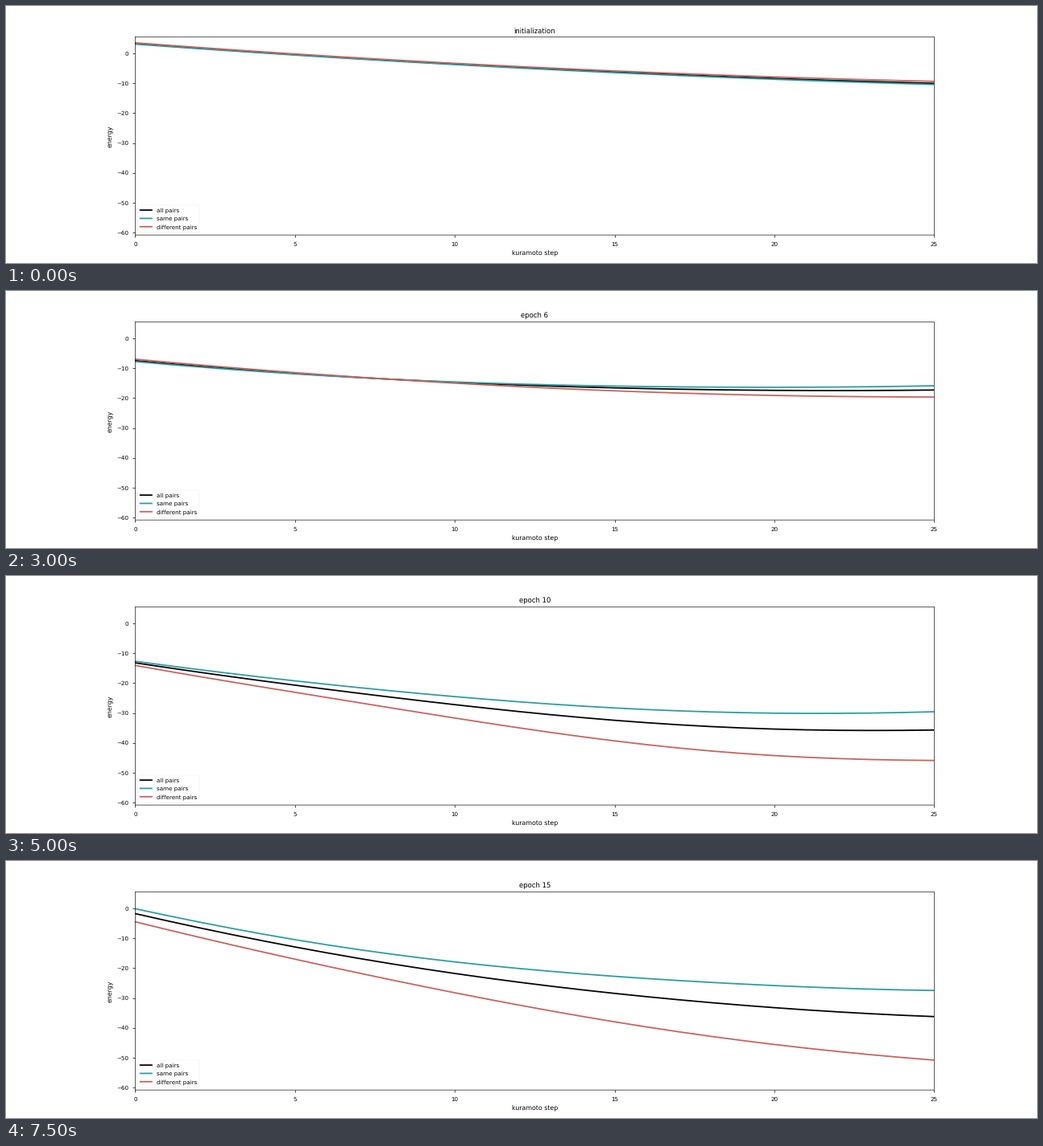
These frames come from a looping animation (1280x320 px, 8 s). A matplotlib script:

```python
import numpy as np
import matplotlib.pyplot as plt
from matplotlib.animation import FuncAnimation

plt.rcParams.update({
    "font.family": "DejaVu Sans",
    "text.hinting": "none",
    "axes.titlesize": 9.6,
    "axes.labelsize": 8.8,
    "axes.linewidth": 0.72,
    "xtick.labelsize": 8,
    "ytick.labelsize": 8,
    "legend.fontsize": 8,
    "xtick.major.pad": 5.6,
    "ytick.major.pad": 5.6,
    "patch.linewidth": 0.24,
    "lines.linewidth": 2,
})

EPOCHS = 16
STEPS = np.arange(26)
DIFF_SHARE = 0.375
DIP = 0.16

# Key epochs: same-pair curve (start, change, bow, lean), gap (start, change, bow)
KEYS = {
    0: (3.05, -13.5, -1.5, 0, 0.45, 0.6, -0.25),
    2: (0, -12.9, -2.8, 0, -0.45, 0.45, 0),
    6: (-7.8, -8.1, -3.6, -0.2, 0.8, -4.55, 0.5),
    8: (-25.3, -13.7, -8.45, -1.4, 0.4, -6.3, -2.6),
    10: (-12.7, -16.9, -5.5, 0.35, -1.4, -14.9, -0.25),
    13: (-4.5, -21.7, -2.3, 0, -2.8, -16.3, 1.65),
    15: (-0.15, -27.35, -6.8, -0.55, -4.35, -18.95, 1.1),
}


def arc(u, start, change, bow, lean):
    """Straight run plus a parabolic bow and an S-shaped lean."""
    return start + change * u + 4 * bow * u * (1 - u) + lean * np.sin(2 * np.pi * u)


def energies(epoch):
    """Curves for all, same and different pairs."""
    marks = list(KEYS)
    shape = [np.interp(epoch, marks, column) for column in zip(*KEYS.values())]
    u = STEPS / STEPS[-1]
    same = arc(u, *shape[:4])
    gap = arc(u, *shape[4:], lean=-0.05 * shape[5])

    # Coupling is a little weaker between the key epochs
    phase = np.interp(epoch, marks, range(len(marks))) % 1
    damp = 1 - DIP * np.sin(np.pi * phase) * u
    return [damp * (same + share * gap) for share in (DIFF_SHARE, 0, 1)]


fig, ax = plt.subplots(figsize=(20, 5), dpi=64)
fig.subplots_adjust(left=0.12525, right=0.90025, bottom=0.109, top=0.879)
lines = [ax.plot([], [], color=color, label=label)[0]
         for label, color in (("all pairs", "black"),
                              ("same pairs", "#2a9d9f"),
                              ("different pairs", "#c9615f"))]
ax.set(xlim=(0, 25), ylim=(-60.79, 5.41), xticks=range(0, 26, 5),
       yticks=range(-60, 1, 10), xlabel="kuramoto step", ylabel="energy")
legend = ax.legend(loc="lower left")
title = ax.set_title("initialization")
for artist in (*ax.spines.values(), *legend.get_lines()):
    artist.set_snap(False)


def draw(epoch):
    for line, values in zip(lines, energies(epoch)):
        line.set_data(STEPS, values)
    title.set_text(f"epoch {epoch}" if epoch else "initialization")
    return [*lines, title]


anim = FuncAnimation(fig, draw, frames=EPOCHS, interval=500,
                     repeat=True, repeat_delay=0, blit=False)
plt.show()
```
